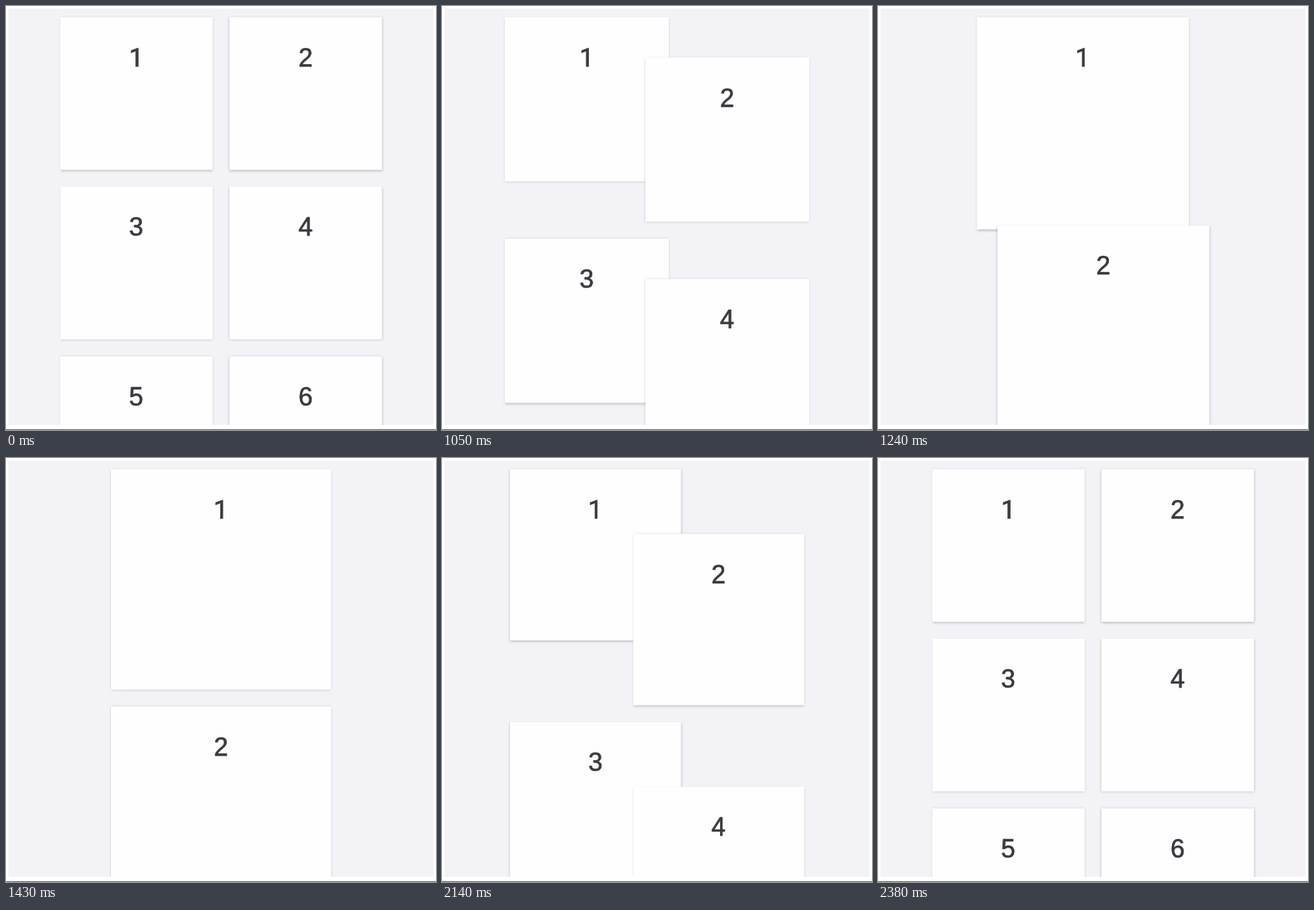
These frames come from a looping animation (512x504 px, 4940 ms). An HTML page with a canvas:

```html
<!DOCTYPE html>
<html lang="en">
<head>
<meta charset="utf-8">
<title>Grid to list transition</title>
<style>
  html, body { margin: 0; width: 100%; height: 100%; overflow: hidden; background: #fff; }
  canvas { display: block; }
</style>
</head>
<body>
<canvas id="stage" width="512" height="504"></canvas>
<script>
const ctx = document.getElementById('stage').getContext('2d');
const LOOP = 4940;
const FPS = 21;
const GAP = 20;
const TOP = 13.2;
const CENTER = 256.1;
const GRID_SIZE = 181.6;
const LIST_SIZE = 262.2;
const CARDS = 6;

const mix = (a, b, p) => a + (b - a) * p;

// The CSS "ease" curve: cubic-bezier(.25, .1, .25, 1).
function ease(x) {
  if (x <= 0) return 0;
  if (x >= 1) return 1;
  let low = 0, high = 1;
  for (let i = 0; i < 30; i++) {
    const s = (low + high) / 2;
    if (0.75 * s * (1 - s) + s ** 3 < x) low = s; else high = s;
  }
  const s = low, r = 1 - s;
  return 0.3 * s * r * r + 3 * s * s * r + s ** 3;
}

// 0 = two-column grid, 1 = single-column list; advances in discrete ticks.
function listAmount(ms) {
  const tick = Math.floor((Math.floor(ms / 10) * 10 + 5) * FPS / 1000);
  const t = tick * 1000 / FPS;
  if (tick < FPS) return 0;
  if (tick < 2 * FPS) return ease((t - 987) / 426);
  return 1 - ease((t - 1966.8) / 406.5);
}

function drawLabel(number, x, y) {
  // Roboto's 1 has no foot, unlike Liberation Sans.
  const family = number === 1 ? 'Roboto' : '"Liberation Sans"';
  ctx.font = `30.5px ${family}, sans-serif`;
  ctx.fillStyle = ctx.strokeStyle = '#39383d';
  ctx.lineWidth = 0.6;
  ctx.fillText(number, x, y);
  ctx.strokeText(number, x, y);
}

function drawCard(index, p) {
  const column = index % 2;
  const row = (index - column) / 2;
  const gridX = CENTER + (column ? GAP / 2 : -GAP / 2 - GRID_SIZE);
  const x = mix(gridX, CENTER - LIST_SIZE / 2, p);
  const y = TOP + mix(row * (GRID_SIZE + GAP), index * (LIST_SIZE + GAP), p);
  const size = mix(GRID_SIZE, LIST_SIZE, p);

  ctx.shadowColor = 'rgba(0, 0, 0, .25)';
  ctx.shadowBlur = 3;
  ctx.shadowOffsetY = 1;
  ctx.fillStyle = '#fefdff';
  ctx.fillRect(x, y, size, size);

  ctx.shadowColor = 'transparent';
  drawLabel(index + 1, x + size / 2 - 0.2, y + 58.5);
}

function draw(ms) {
  const p = listAmount(ms);
  ctx.fillStyle = '#fff';
  ctx.fillRect(0, 0, 512, 504);
  ctx.fillStyle = '#777';
  ctx.fillRect(0, 503, 512, 1);

  ctx.save();
  ctx.beginPath();
  ctx.rect(3, 3, 506, 495);
  ctx.clip();
  ctx.fillStyle = '#f3f2f7';
  ctx.fillRect(3, 3, 506, 495);
  ctx.textAlign = 'center';
  for (let i = 0; i < CARDS; i++) drawCard(i, p);
  ctx.restore();
}

const start = performance.now();
function frame() {
  draw((performance.now() - start) % LOOP);
  requestAnimationFrame(frame);
}
frame();
</script>
</body>
</html>
```
